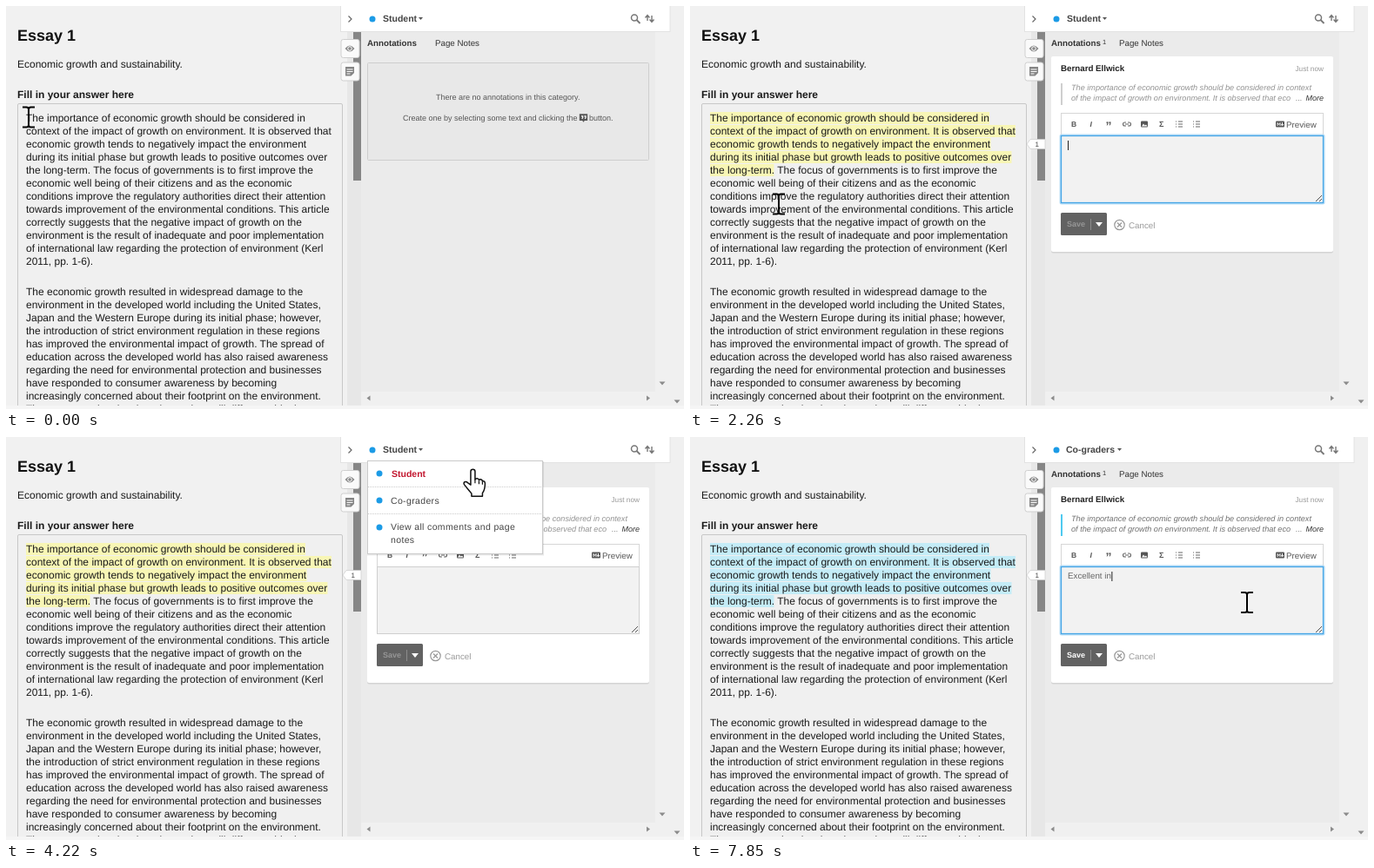
These frames come from a looping animation (779x464 px, 8000 ms). An HTML page:

```html
<!DOCTYPE html>
<html lang="en">
<head>
<meta charset="utf-8">
<title>Essay annotation</title>
<style>
  html, body { margin: 0; width: 100%; height: 100%; overflow: hidden; background: #f1f1f1; }
  svg { display: block; width: 100%; height: 100%; font-family: "Liberation Sans", Arial, sans-serif; text-rendering: geometricPrecision; }
  text { white-space: pre; }
  .b { font-weight: bold; }
  .i { font-style: italic; }
</style>
</head>
<body>
<svg id="stage" viewBox="0 0 779 464"></svg>
<script>
const LOOP = 8000;
const essay = [
  "The importance of economic growth should be considered in",
  "context of the impact of growth on environment. It is observed that",
  "economic growth tends to negatively impact the environment",
  "during its initial phase but growth leads to positive outcomes over",
  "the long-term. The focus of governments is to first improve the",
  "economic well being of their citizens and as the economic",
  "conditions improve the regulatory authorities direct their attention",
  "towards improvement of the environmental conditions. This article",
  "correctly suggests that the negative impact of growth on the",
  "environment is the result of inadequate and poor implementation",
  "of international law regarding the protection of environment (Kerl",
  "2011, pp. 1-6).",
  "The economic growth resulted in widespread damage to the",
  "environment in the developed world including the United States,",
  "Japan and the Western Europe during its initial phase; however,",
  "the introduction of strict environment regulation in these regions",
  "has improved the environmental impact of growth. The spread of",
  "education across the developed world has also raised awareness",
  "regarding the need for environmental protection and businesses",
  "have responded to consumer awareness by becoming",
  "increasingly concerned about their footprint on the environment.",
  "The way countries developed over time still differs to this day"
];
const lineEnds = [344, 374, 345.5, 369.5, 96.5];

const text = (x, y, size, str, fill = "#1a1a1a", extra = "") =>
  `<text x="${x}" y="${y}" font-size="${size}" fill="${fill}" ${extra}>${str}</text>`;
const bold = (x, y, size, str, fill, extra = "") => text(x, y, size, str, fill, `class="b" ${extra}`);
const rect = (x, y, w, h, fill, extra = "") =>
  `<rect x="${x}" y="${y}" width="${w}" height="${h}" fill="${fill}" ${extra}/>`;
const path = (d, fill = "none", stroke = "none", width = 1, extra = "") =>
  `<path d="${d}" fill="${fill}" stroke="${stroke}" stroke-width="${width}" ${extra}/>`;
const group = (id, body) => `<g id="${id}">${body}</g>`;
const dot = (x, y) => `<circle cx="${x}" cy="${y}" r="3.5" fill="#1c9be6"/>`;
const bubble = (x, y, s, fill) =>
  `<g transform="translate(${x} ${y}) scale(${s})">` +
  path("M-5.5-5.500h11v9h-4l-1.500 2-1.500-2h-4z", fill) +
  path("M-3-2.500h2v2l-1 1.500M1-2.500h2v2l-1 1.500", "none", "#fff", 1.4) + "</g>";
const lines = (count, fill, extra = "") => essay.slice(0, count)
  .map((s, n) => text(23, 133 + 15 * n + (n > 11 ? 20 : 0), 12, s, fill, extra)).join("");

function page() {
  return rect(0, 0, 779, 464, "#f1f1f1") +
    bold(13, 40, 18, "Essay 1", "#111") +
    text(13, 71, 12, "Economic growth and sustainability.") +
    bold(13, 106, 12, "Fill in your answer here") +
    rect(13.5, 112.5, 373, 370, "#f0f0f0", 'stroke="#c8c8c8" rx="1.5"') +
    group("mark", lineEnds.map((x, n) => rect(23, 122 + 15 * n, x - 23, 14, "currentColor")).join("")) +
    lines(essay.length) +
    `<clipPath id="range">${lineEnds.map(() => rect(23, 0, 0, 15, "#000")).join("")}</clipPath>` +
    `<g id="selection" clip-path="url(#range)">${rect(20, 120, 360, 80, "#3390ff")}` +
    lines(5, "#fff", 'stroke="#fff" stroke-width=".45"') + "</g>";
}

function sidebar() {
  const button = y => rect(385, y, 21, 21, "#fafafa", 'rx="2.5" stroke="#cfcfcf"');
  return rect(392, 30, 16, 430, "#e7e7e7") +
    rect(399, 30, 9, 171, "#868686") +
    rect(408, 29, 338, 415, "#ebebeb") +
    rect(746, 29, 17, 431, "#f0f0f0") +
    rect(408, 444, 338, 16, "#f0f0f0") +
    rect(763, 0, 16, 464, "#f0f0f0") +
    rect(0, 460, 779, 4, "#f5f5f5") +
    path("M418.500 448.500v6l-4-3zM736 448.500v6l4-3zM750.500 432.500h7l-3.500 4zM767.500 453.500h7l-3.500 4z", "#8b8b8b") +
    rect(384.5, -1, 378.5, 30.5, "#fff", 'stroke="#e2e2e2"') +
    path("M393.500 11.500l3.500 3.500-3.500 3.500", "none", "#666", 1.2) +
    dot(421, 15) +
    group("groupStudent", bold(433, 18, 10.5, "Student", "#444") + path("M474 13h5l-2.500 3z", "#555")) +
    group("groupGraders", bold(432, 18, 10.5, "Co-graders", "#444") + path("M491 13h5l-2.500 3z", "#555")) +
    `<circle cx="722" cy="13.500" r="3.500" fill="none" stroke="#777" stroke-width="1.500"/>` +
    path("M724.500 16l4 4", "none", "#777", 1.8) +
    path("M737 17v-6m-2.500 2.500l2.500-3 2.500 3M742 11v7m-2.500-2.500l2.500 3 2.500-3", "none", "#777", 1.4) +
    button(38.5) + button(65) +
    path("M389.500 49q5.500-7 11 0-5.500 7-11 0z", "#8a8a8a") +
    `<circle cx="395" cy="49" r="2.300" fill="#8a8a8a" stroke="#fff"/>` +
    group("noteIcon", path("M390 70h10v7l-3.500 3.500H390z", "#858585") +
      path("M391.500 73h7M391.500 75.500h7M391.500 78h4", "none", "#fff", 1)) +
    group("quoteIcon", bubble(395, 76, 1, "#858585")) +
    bold(415, 46, 9.75, "Annotations", "#333") +
    text(493, 46, 9.75, "Page Notes", "#333");
}

function emptyCard() {
  return rect(415.5, 65.5, 323, 112, "#e8e8e8", 'stroke="#cecece" rx="1"') +
    text(494, 108, 9, "There are no annotations in this category.", "#555") +
    text(456, 132, 9, "Create one by selecting some text and clicking the", "#555") +
    bubble(663.5, 129, 0.85, "#555") +
    text(670, 132, 9, "button.", "#555");
}

function toolbar() {
  const list = x => path(`M${x} 133h1m2 0h5M${x} 136h1m2 0h5M${x} 139h1m2 0h5`, "none", "#666", 1.1);
  return rect(426.5, 123.5, 301, 26, "#fff", 'stroke="#d6d6d6"') +
    bold(438, 139, 8.5, "B", "#555") +
    bold(459.5, 139, 8.5, "I", "#555", 'font-style="italic"') +
    bold(477.5, 143, 14, "”", "#555") +
    path("M501 134h-1.500a2 2 0 0 0 0 4h1.500M503 134h1.500a2 2 0 0 1 0 4h-1.500M500 136h4", "none", "#666", 1.1) +
    rect(518, 132.5, 8, 7, "#555", 'rx="1"') + path("M519 138.500l2-3 1.500 2 1.500-1 1.500 2z", "#fff") +
    bold(539, 139, 9, "Σ", "#555") + list(558) + list(578) +
    rect(673, 132.5, 10, 7, "#555", 'rx="1"') +
    path("M675 138v-3.500l1.500 2 1.500-2v3.500M680.500 134v3m-1.500-1l1.500 2 1.500-2", "none", "#fff", 0.9) +
    text(685, 140, 9.75, "Preview", "#555");
}

function card() {
  return rect(415, 59.5, 324, 225, "#d4d4d4", 'rx="2"') +
    rect(415, 58, 324, 225, "#fff", 'rx="2"') +
    text(474, 44, 7.5, "1", "#333") +
    path("M387 159l4-5.500h17v11h-17z", "#fff", "#ccc", 0.7) +
    text(396.5, 162, 8, "1", "#444") +
    bold(426, 75, 9.75, "Bernard Ellwick", "#222") +
    text(728, 75, 8.25, "Just now", "#999", 'text-anchor="end"') +
    `<rect id="quoteBar" x="426" y="89" width="2" height="25"/>` +
    group("quote", text(438, 97, 9.15, "The importance of economic growth should be considered in context", "currentColor", 'class="i"') +
      text(438, 109, 9.15, "of the impact of growth on environment. It is observed that eco", "currentColor", 'class="i"')) +
    rect(692, 101, 40, 11, "#fff") +
    text(696, 109, 9, "...", "#777", 'class="i"') +
    text(728, 109, 9, "More", "#333", 'class="i" text-anchor="end"') +
    toolbar() +
    rect(426.5, 149.5, 301, 77, "#f2f2f2", 'stroke="#cfcfcf"') +
    group("focus", rect(426, 149, 302, 78, "none", 'stroke="#b4dcf6" stroke-width="3" rx="1"') +
      rect(426.5, 149.5, 301, 77, "#f2f2f2", 'stroke="#45a5e6" stroke-width="1.300"')) +
    path("M719 225l7-7M723 225l3-3", "none", "#555", 1) +
    `<text id="typed" x="434" y="163" font-size="9.75" fill="#666"></text>` +
    `<rect id="caret" y="155" width="1" height="11" fill="#222"/>` +
    rect(426, 238, 53, 26, "#626262", 'rx="1.500"') +
    `<text id="save" class="b" x="433" y="254" font-size="9">Save</text>` +
    path("M460.500 245v13", "none", "#8c8c8c", 1) +
    path("M466 249h8l-4 5z", "#fff") +
    `<circle cx="493.500" cy="252" r="5.700" fill="none" stroke="#999" stroke-width="1.200"/>` +
    path("M491 249.500l5 5m0-5l-5 5", "none", "#999", 1.3) +
    text(504, 256, 9.75, "Cancel", "#999");
}

function menu() {
  const spaced = 'letter-spacing=".35"';
  return rect(415, 28, 203, 108.5, "#000", 'opacity=".09"') +
    rect(415.5, 27.5, 201, 107, "#fff", 'stroke="#cacaca"') +
    path("M416 57.500h200M416 88.500h200", "none", "#ccc", 1, 'stroke-dasharray="1 1"') +
    dot(429, 42) + dot(429, 73) + dot(429, 104) +
    group("itemStudent", bold(443, 46, 10.5, "Student", "currentColor")) +
    group("itemGraders", text(442, 77, 10.5, "Co-graders", "currentColor", spaced)) +
    text(442, 107, 10.5, "View all comments and page", "#444", spaced) +
    text(442, 122, 10.5, "notes", "#444", spaced);
}

function adder() {
  return path("M-49.500 3q0-2 2-2H2l5-5 5 5H47.500q2 0 2 2V41q0 2-2 2H-47.500q-2 0-2-2z", "#fff", "#bbb", 1) +
    bubble(-24, 17, 1.25, "#555") +
    path("M25 10h8v6l-2 3v5h-4v-5l-2-3z", "#555") +
    text(-24, 34, 8.5, "Annotate", "#777", 'text-anchor="middle"') +
    text(27, 34, 8.5, "Highlight", "#777", 'text-anchor="middle"');
}

const ibeam = path("M-7-11.500h4.500q2.500 0 2.500 2.500v18q0 2.500-2.500 2.500H-7M7-11.500H2.500Q0-11.500 0-9M0 9q0 2.500 2.500 2.500H7", "none", "#000", 2);
const hand = path("M-3 2.500a2.500 2.500 0 0 1 5 0V12c1-2 4-1.600 4.500.4 1.500-1.400 4-.6 4 1.600 1.500-1 3 0 3 2.500 0 6-1 8-3 11V31H-2v-3C-5 24-8 21-10.500 17.500c-1.500-3 2-4 4-2L-3 18z", "#fff", "#111", 1.5, 'stroke-linejoin="round"') +
  path("M2 12v4M6.500 13v4M10.500 14.500v3", "none", "#111", 1.2);

const stage = document.getElementById("stage");
stage.innerHTML = page() + sidebar() + group("empty", emptyCard()) + group("card", card()) +
  group("menu", menu()) + group("adder", adder()) +
  `<circle id="ring" r="17" fill="none" stroke="#f28a2e" stroke-width="1.500" opacity=".8"/>` +
  group("cursor", group("ibeam", ibeam) + group("hand", hand));

const el = {};
stage.querySelectorAll("[id]").forEach(node => el[node.id] = node);
const ranges = [...el.range.children];
const show = (id, on) => el[id].style.display = on ? "" : "none";
const move = (id, x, y, rest = "") => el[id].setAttribute("transform", `translate(${x} ${y}) ${rest}`);
const within = (t, a, b) => t >= a && t < b;

// Pointer stops: time, x, y
const stops = [
  [0, 26, 128], [400, 26, 128], [1190, 102, 191], [1640, 102, 191], [2060, 102, 228],
  [2480, 102, 228], [2880, 499, 27], [3040, 472, 14], [4000, 472, 14], [4220, 537, 37],
  [4480, 520, 75], [4960, 520, 75], [5350, 555.5, 167], [5660, 555.5, 167],
  [5860, 611, 178], [6120, 611, 178], [6240, 640, 190.5], [LOOP, 640, 190.5]
];
function pointer(t) {
  const n = stops.findIndex(s => s[0] > t);
  const [t0, x0, y0] = stops[n - 1], [t1, x1, y1] = stops[n];
  const p = (t - t0) / (t1 - t0);
  return [x0 + (x1 - x0) * p, y0 + (y1 - y0) * p];
}

const phrase = "Excellent in";
const keyTimes = [6490, 6740, 6920, 7027, 7134, 7241, 7348, 7455, 7562, 7670, 7800, 7850];

function selectTo(x, y) {
  const current = Math.min(4, Math.max(0, Math.floor((y - 122) / 15)));
  ranges.forEach((r, n) => {
    const end = n < current ? lineEnds[n] + 3 : n === current ? Math.min(x, lineEnds[n] + 3) : 23;
    r.setAttribute("y", 122 + 15 * n);
    r.setAttribute("width", Math.max(0, end - 23));
  });
}

function render(t) {
  const [x, y] = pointer(t);
  const annotated = t >= 2260, graders = t >= 4910;

  show("selection", within(t, 420, 2260));
  selectTo(Math.min(x, t > 1180 ? 99.5 : x), y > 190 ? 190 : y);
  show("mark", annotated);
  el.mark.style.color = graders ? "#c4ecf7" : "#f8f6b5";

  const adding = within(t, 1550, 2260);
  show("adder", adding);
  const grow = Math.min(1, Math.max(0, (t - 1580) / 150));
  move("adder", 95.5, 199, `scale(${0.78 + 0.22 * grow})`);
  el.adder.style.opacity = 0.6 + 0.4 * grow;
  show("quoteIcon", adding);
  show("noteIcon", !adding);

  show("empty", !annotated);
  show("card", annotated);
  show("groupStudent", !graders);
  show("groupGraders", graders);
  el.quoteBar.setAttribute("fill", graders ? "#4fcaf0" : "#cfcfcf");
  el.quote.style.color = graders ? "#707070" : "#929292";

  const open = within(t, 3300, 4910);
  show("menu", open);
  el.itemStudent.style.color = within(y, 28, 57.5) ? "#c2172f" : "#444";
  el.itemGraders.style.color = within(y, 57.5, 88) ? "#c2172f" : "#444";

  const focused = within(t, 2260, 3200) || t >= 5720;
  show("focus", focused);
  show("caret", focused && !within(t, 6240, 6490));
  el.typed.textContent = phrase.slice(0, keyTimes.filter(k => k <= t).length);
  el.caret.setAttribute("x", 434 + el.typed.getComputedTextLength() + (t < 6490 ? 0 : 0.5));
  el.save.setAttribute("fill", t >= 6550 ? "#fff" : "#969696");

  const clicking = within(t, 220, 420) || within(t, 1250, 1550);
  show("ring", clicking);
  move("ring", x - 3, y - 1.5);

  const pointing = within(t, 1880, 2260) || within(t, 2780, 5230);
  show("hand", pointing);
  show("ibeam", !pointing);
  move("cursor", x, y);
}

const start = performance.now();
function tick() {
  render((performance.now() - start) % LOOP);
  requestAnimationFrame(tick);
}
tick();
</script>
</body>
</html>
```
